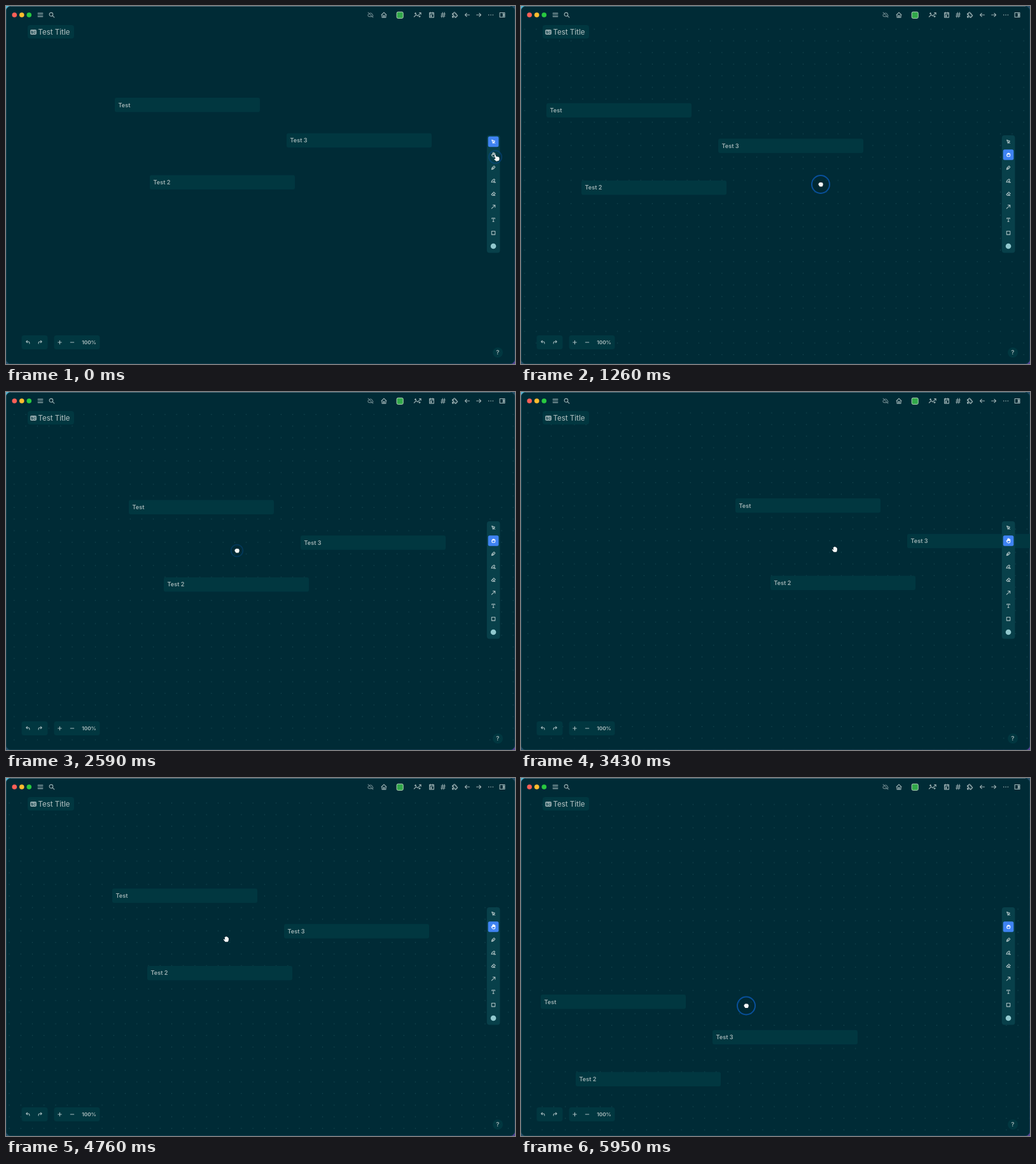
Recreate the animation shown at these times as an HTML page. Size 800 by 562 pixels, loop 6.02 s.

```html
<!DOCTYPE html>
<html lang="en">
<head>
<meta charset="utf-8">
<title>Whiteboard panning</title>
<style>
html, body { margin: 0; width: 100%; height: 100%; overflow: hidden; background: #002b36; }
svg { display: block; width: 800px; height: 562px; }
text { font: 600 9.1px Inter, "Open Sans", sans-serif; fill: #a1b3b4; }
.icon { fill: none; stroke: #9db1b3; stroke-width: 2.6; stroke-linecap: round; stroke-linejoin: round; }
.tool { stroke: #a9bec0; stroke-width: 3.2; }
.panel { fill: #08404a; }
.soft { fill: #013740; }
</style>
</head>
<body>
<svg id="stage" viewBox="0 0 800 562"></svg>
<script>
const LOOP = 6020, STEP = 70, LAG = 70;

// Cursor path: time, x, y
const PATH = [
  [0, 769, 237], [140, 769, 237], [630, 602, 271.5], [700, 602, 271.5],
  [1190, 471, 280], [1260, 471, 280], [1680, 594, 296], [1750, 620, 296],
  [1840, 638, 297], [1960, 624, 297], [2450, 363, 249], [2590, 363, 249],
  [3290, 507, 246.5], [3430, 493, 247], [3900, 493, 247],
  [4620, 323, 253.5], [4690, 326, 253.5], [4760, 346, 253],
  [5130, 490, 191], [5200, 490, 191], [5880, 354, 357.5], [5950, 354, 357.5], [6020, 354, 357.5]
];
const DRAGS = [[700, 1960], [2520, 3290], [3900, 4620], [5200, 6020]];
const PRESSES = [[-90, 60], ...DRAGS];

const HAND = 'M8 13V5.5a1.5 1.5 0 0 1 3 0V12M11 5.5v-2a1.5 1.5 0 1 1 3 0V12M14 5.5a1.5 1.5 0 0 1 3 0V12' +
  'M17 7.5a1.5 1.5 0 0 1 3 0V16a6 6 0 0 1-6 6h-2a6 6 0 0 1-5-2.7l-3.2-5.6a1.5 1.5 0 0 1 2.6-1.5L8 13.7';
const FIST = 'M8 11V7.5a1.5 1.5 0 0 1 3 0V10M11 7v-.5a1.5 1.5 0 0 1 3 0V10M14 7.5a1.5 1.5 0 0 1 3 0V10' +
  'M17 9a1.5 1.5 0 0 1 3 0v5a6 6 0 0 1-6 6h-3a6 6 0 0 1-6-6v-2a2 2 0 0 1 3-2';
const CURSORS = {
  open: 'M-1.9-.5L-2.4-3Q-2-4-1.3-3L-.7-4Q0-4.7.5-3.9Q1.4-4.5 1.9-3.1Q3-3.5 3.2-2Q4.2-2 4 0Q4 3 2.5 4.3H-1.5L-4 1Q-4.4-.4-3.2-.1L-1.9 1Z',
  fist: 'M-3.6.4L-3.4-1Q-3.2-1.8-2.5-2Q-2.2-3.2-.8-2.9Q.3-3.7 1.3-2.8Q2.7-3.2 3.1-2Q3.9-1.5 3.8.3Q3.6 2.3 2.4 3.6H-1.5Z',
  point: 'M-1.6-3.3Q-.8-4.7.3-3.4L1.5-.5Q2.6-1.2 3.4-.2Q4.4-.8 5-.1Q6.2 0 6.4 1.3Q7 4 5.6 5.8L1.8 6.8L-1.7 4.1Q-2.2 2.8-.9 2.9L.3 3.3Z'
};

const icon = (d, x, y, s = .45, cls = '', extra = '') =>
  `<path class="icon ${cls}" d="${d}" transform="translate(${x - 12 * s} ${y - 12 * s}) scale(${s})" ${extra}/>`;
const box = (x, y, w, h, cls, r = 4) =>
  `<rect x="${x}" y="${y}" width="${w}" height="${h}" rx="${r}" class="${cls}"/>`;
const label = (s, x, y, size = 9.1, weight = 600) =>
  `<text x="${x}" y="${y}" style="font-size:${size}px;font-weight:${weight}">${s}</text>`;
const block = (s, x, y) => box(x, y, 228, 22.5, 'soft', 3) + label(s, x + 5.5, y + 14.5);

const LEFT = 'M20 12H4M10 6l-6 6 6 6', RIGHT = 'M4 12h16M14 6l6 6-6 6';
const TOP = [
  ['M3 6h18M3 12h18M3 18h18', 54],
  ['M16 10a6.5 6.5 0 1 1-13 0a6.5 6.5 0 0 1 13 0M15 15l6 6', 72],
  ['M3 3l18 18M9 6a6 6 0 0 1 9 5a3.6 3.6 0 0 1 2 6M17 18H7a4.5 4.5 0 0 1 0-9', 573, .65],
  ['M3 12l9-9 9 9M5 11v10h14V11M10 21v-7h4v7', 594],
  ['M-1 19l8-8 5 5L24 4M18 4h6v6M4 4v5M1.500 6.500h5M19 15v5M16.500 17.500h5', 647],
  ['M4 4h16v17H4zM4 9h16M8 2v4M16 2v4M8 14h4v3H8z', 669],
  ['M5 9h15M4 16h15M10 3L7 21M17 3l-3 18', 687],
  ['M4 7h5a3 3 0 1 1 5 0h4v5a3 3 0 1 1 0 5v4h-5a3 3 0 1 0-5 0H4v-5a3 3 0 1 0 0-5z', 705],
  [LEFT, 725], [RIGHT, 743],
  ['M4 11.700h.6v.6H4zM11.700 11.700h.6v.6h-.6zM19.400 11.700h.6v.6h-.6z', 762],
  ['M3 4h18v16H3zM15 4v16M18 8v8', 780]
];
const TOOLS = [
  'M5 4l14 6-6 3-2 7zM13 13l6 6',
  HAND,
  'M4 20l2-8L15 4l5 5-8 9zM4 20l8-8',
  'M3 19l3-8 9-7 4 4-7 9zM13 20h9M16 15l5 4',
  'M8 20l-5-5L14 4l7 7-9 9zM8 10l7 7M8 20h12',
  'M4 20L20 4M10 4h10v10',
  'M5 7V4h14v3M12 4v16M9 20h6',
  'M4 4h16v16H4z'
];
const toolY = i => 213 + 20.45 * i;

const stage = document.getElementById('stage');
stage.innerHTML = `
<defs>
  <linearGradient id="desk" x2="1" y2="1">
    <stop stop-color="#58b5d2"/><stop offset=".5" stop-color="#28506a"/><stop offset="1" stop-color="#564496"/>
  </linearGradient>
  <pattern id="grid" width="18.24" height="18.24" patternUnits="userSpaceOnUse">
    <circle cx="9.1" cy="9.8" r=".65" fill="#1a4d57"/>
  </pattern>
</defs>
<rect width="800" height="562" fill="url(#desk)"/>
<rect x=".3" y=".5" width="799.4" height="561.2" rx="7" fill="#002b36" stroke="#194654" stroke-width=".6"/>
<path d="M7 .5H793" stroke="#4d6c7a"/>
<rect id="dots" x="1" y="28" width="798" height="533" fill="url(#grid)"/>
<g id="board">
  ${block('Test', 171, 144)}${block('Test 3', 441, 199.7)}${block('Test 2', 226, 265.4)}
</g>
${['#ff5f57', '#febc2e', '#28c840'].map((c, i) => `<circle cx="${13.3 + 11.5 * i}" cy="14" r="3.8" fill="${c}"/>`).join('')}
${TOP.map(([d, x, o = 1]) => icon(d, x, 14, .43, '', `opacity="${o}"`)).join('')}
<rect x="614.2" y="9.3" width="10" height="10" rx="2" fill="#31a849" stroke="#b4d3ba"/>
${box(34, 30, 73, 21, 'soft')}
<rect x="38" y="37" width="10" height="8" rx="2" fill="#91a7aa"/>
<path d="M40 39.5v3h2.5v-2zM44 40h2.5M44 42.5h2" fill="none" stroke="#033741" stroke-width=".9"/>
${label('Test Title', 50.5, 45, 11.4, 500)}
${box(24.5, 517, 41, 22, 'soft')}${box(75.5, 517, 72, 22, 'soft')}
${icon('M9 14L4 9l5-5M4 9h10a5 5 0 0 1 5 5v4', 34.5, 528, .34, 'tool')}
${icon('M15 14l5-5-5-5M20 9H10a5 5 0 0 0-5 5v4', 53.5, 528, .34, 'tool')}
${icon('M12 4v16M4 12h16', 84.5, 528, .34, 'tool')}${icon('M4 12h16', 104, 528, .34, 'tool')}
${label('100%', 119.2, 531.2, 8.1, 700)}
<circle cx="773" cy="544" r="8" class="soft"/>${label('?', 770.3, 547.3, 9.5)}
${box(755.8, 203, 20.6, 184.5, 'panel')}
<rect id="active" x="757.7" width="16.6" height="16.6" rx="2.5" fill="#3f83f2"/>
${TOOLS.map((d, i) => icon(d, 766, toolY(i), .34, 'tool', `id="tool${i}"`)).join('')}
<circle cx="766" cy="377" r="4.3" fill="#91c8ce"/>
<circle id="ring" fill="#00222c" fill-opacity=".15" stroke="#08509b" stroke-width="2"/>
<path id="cursor" fill="#f4f7f7" stroke="#0a1c22" stroke-width=".7" paint-order="stroke"/>`;

const el = id => document.getElementById(id);
const set = (id, attrs) => { for (const k in attrs) el(id).setAttribute(k, attrs[k]); };
const clamp = (v, a, b) => Math.min(b, Math.max(a, v));

// Monotone cubic curve through the path points
function slope(i, k) {
  if (i < 1 || i > PATH.length - 2) return 0;
  const rate = j => (PATH[j + 1][k] - PATH[j][k]) / (PATH[j + 1][0] - PATH[j][0]);
  const a = rate(i - 1), b = rate(i);
  return a * b <= 0 ? 0 : 2 * a * b / (a + b);
}
function cursorAt(t) {
  t = clamp(t, 0, LOOP);
  let i = 0;
  while (i < PATH.length - 2 && PATH[i + 1][0] < t) i++;
  const p = PATH[i], q = PATH[i + 1], h = q[0] - p[0], u = (t - p[0]) / h;
  return [1, 2].map(k =>
    p[k] + (q[k] - p[k]) * u * u * (3 - 2 * u) +
    h * u * (1 - u) * ((1 - u) * slope(i, k) - u * slope(i + 1, k)));
}
// The board follows the cursor only while a drag lasts
function panAt(t) {
  let x = 0, y = 0;
  for (const [start, end] of DRAGS) {
    const a = cursorAt(start), b = cursorAt(clamp(t, start, end));
    x += b[0] - a[0];
    y += b[1] - a[1];
  }
  return [x, y];
}

function draw(t) {
  const [x, y] = cursorAt(t), pan = panAt(t - LAG), ringPos = cursorAt(t - 32);
  const fist = DRAGS.some(([a, b]) => t >= a && t <= b);
  const strength = Math.max(...PRESSES.map(([a, b]) =>
    clamp(Math.min((t - a) / 210, (b + 120 - t) / 120), 0, 1)));
  const selected = t < 140 ? 0 : 1;

  set('board', { transform: `translate(${pan})` });
  set('grid', { patternTransform: `translate(${pan})` });
  set('dots', { opacity: t < STEP ? 0 : 1 });
  set('active', { y: toolY(selected) - 8.3 });
  TOOLS.forEach((_, i) => { el('tool' + i).style.stroke = i === selected ? '#eef4ff' : ''; });
  set('tool1', { d: fist ? FIST : HAND });
  set('ring', { cx: ringPos[0], cy: ringPos[1], r: 7 + 7 * strength, opacity: strength });
  set('cursor', {
    d: CURSORS[x > 755 ? 'point' : fist ? 'fist' : 'open'],
    transform: `translate(${x} ${y})`
  });
}

const began = performance.now();
function frame() {
  const t = (performance.now() - began) % LOOP;
  draw(Math.floor(t / STEP) * STEP);
  requestAnimationFrame(frame);
}
frame();
</script>
</body>
</html>
```
